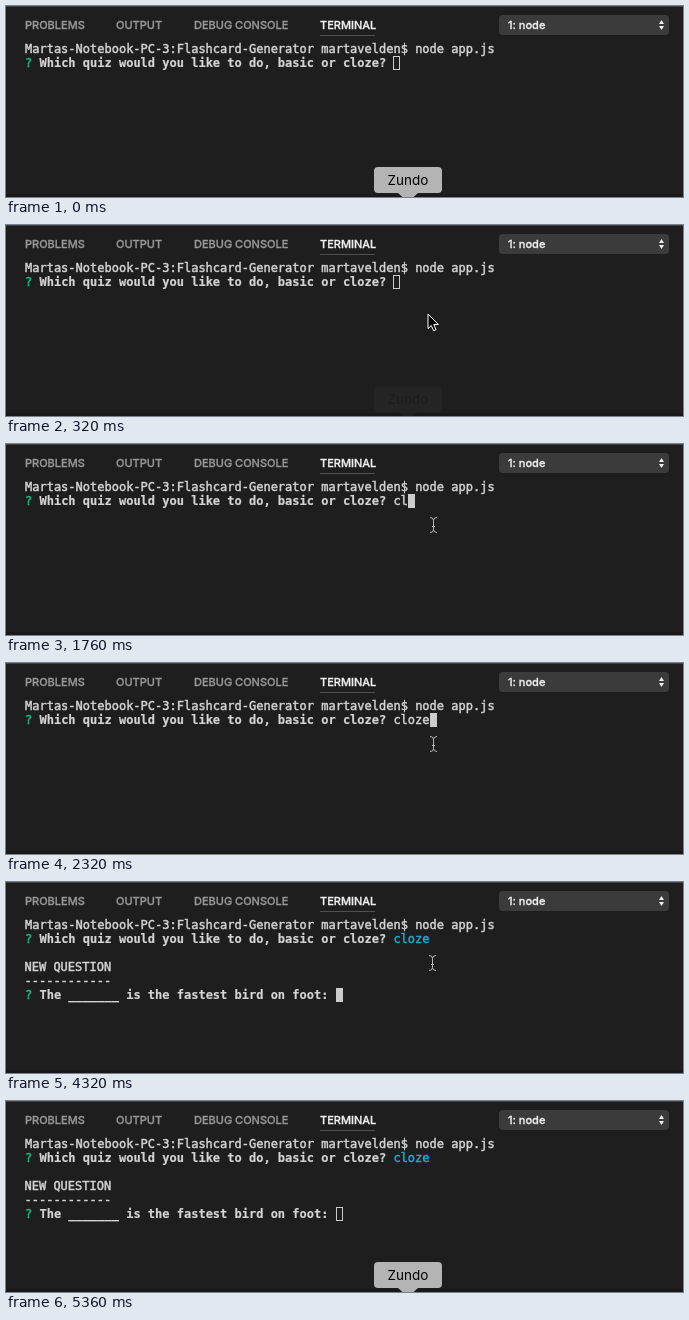
An HTML page that plays this animation: 677x191 px, repeating every 5.44 s.

```html
<!DOCTYPE html>
<html lang="en">
<head>
<meta charset="utf-8">
<title>Terminal quiz</title>
<style>
  html, body { margin: 0; width: 100%; height: 100%; overflow: hidden; background: #1e1e1e; }
  svg { display: block; }
  text { white-space: pre; }
  .ui { font: 500 11px Inter, sans-serif; }
  .ui text { fill: #979797; stroke: #979797; stroke-width: .3; }
  .ui .lit { fill: #f0f0f0; stroke: #f0f0f0; }
  .term { font: 12px "DejaVu Sans Mono", monospace; fill: #d4d4d4; stroke: #d4d4d4; stroke-width: .45; }
  .bold { font-weight: bold; stroke-width: .2; }
  .ok { font-weight: normal; fill: #15bf84; stroke: #15bf84; stroke-width: .4; }
  .done { fill: #14b0d8; stroke: #14b0d8; }
</style>
</head>
<body>
<svg width="677" height="191" viewBox="0 0 677 191">
  <rect width="677" height="191" fill="#1e1e1e"/>
  <rect width="677" height="1" fill="#414141"/>
  <rect y="188" width="677" height="3" fill="#19191a"/>

  <g class="ui">
    <text x="19" y="23">PROBLEMS</text>
    <text x="110" y="23">OUTPUT</text>
    <text x="188" y="23">DEBUG CONSOLE</text>
    <text x="314" y="23" class="lit">TERMINAL</text>
    <rect x="314" y="29" width="55" height="1" fill="#505050"/>
    <rect x="493" y="9" width="170" height="20" rx="4" fill="#3b3b3b"/>
    <text x="502" y="23" class="lit">1: node</text>
    <path d="M653 18l2.5-4 2.5 4zM653 20l2.5 4 2.5-4z" fill="#eee"/>
  </g>

  <g class="term">
    <text x="19" y="47">Martas-Notebook-PC-3:Flashcard-Generator martavelden$ node app.js</text>
    <text x="19" y="61" class="bold"><tspan class="ok">?</tspan> Which quiz would you like to do, basic or cloze?</text>
    <text id="answer" x="387.4" y="61"></text>
    <g id="question">
      <text x="18.5" y="89">NEW QUESTION</text>
      <text x="18.5" y="103">------------</text>
      <text x="19" y="117" class="bold"><tspan class="ok">?</tspan> The _______ is the fastest bird on foot:</text>
    </g>
  </g>
  <rect id="caret" width="6" height="13" stroke="#ccc"/>

  <g id="tip">
    <path d="M372 161h60q4 0 4 4v18q0 4-4 4h-20l-10 9-10-9h-20q-4 0-4-4v-18q0-4 4-4z" fill="#b4b4b4"/>
    <text x="402" y="179" text-anchor="middle" style="font:13.5px Inter,sans-serif">Zundo</text>
  </g>

  <path id="arrow" d="M0 0V14.6L3.3 11.5 5.6 16.7 8 15.7 5.8 10.5H10.4Z" stroke="#fff" stroke-linejoin="round"/>
  <path id="beam" d="M-3-7.5Q.5-7.5 .5-4.5Q.5-7.5 4-7.5M.5-4.5V4.5M-3 7.5Q.5 7.5 .5 4.5Q.5 7.5 4 7.5M-1 1.5H2" fill="none" stroke="#b8b8b8"/>
</svg>
<script>
  const LOOP = 5440, STEP = 80, CHAR = 7.224;
  const KEYS = [1600, 1760, 1920, 2080, 2320];
  const $ = id => document.getElementById(id);
  const clamp = v => Math.max(0, Math.min(1, v));
  const show = (id, on) => $(id).setAttribute("visibility", on ? "visible" : "hidden");

  function pointerAt(t) {
    if (t < 720) {
      const left = 1 - clamp(t / 560);
      return [427 - 25 * left ** 2, 80 + 115 * left ** 3];
    }
    if (t < 800) return [444, 86];
    const p = clamp((t - 4240) / 560);
    return [427 - 30.5 * p ** 2, 81 + 73.5 * p ** 2.6];
  }

  function caretAt(t, typed) {
    if (t >= 3040) return [43, 5];
    if (t >= 2960) return [0, 2];
    return [51 + typed, 1];
  }

  function draw(time) {
    const t = Math.floor(time % LOOP / STEP) * STEP;
    const typed = KEYS.filter(k => t >= k).length;
    $("answer").textContent = "cloze".slice(0, typed);
    $("answer").classList.toggle("done", t >= 2960);
    show("question", t >= 3040);

    const [col, row] = caretAt(t, typed);
    $("caret").setAttribute("x", Math.round(19 + col * CHAR) + .5);
    $("caret").setAttribute("y", 36.5 + row * 14);
    $("caret").setAttribute("fill", t >= 800 && t < 5360 ? "#ccc" : "none");

    const fade = t < 4800 ? clamp(1 - t / 400) ** 2 : clamp((t - 4800) / 240);
    $("tip").setAttribute("opacity", fade);

    const [x, y] = pointerAt(t);
    const place = `translate(${Math.floor(x)},${Math.round(y)})`;
    $("arrow").setAttribute("transform", place);
    $("beam").setAttribute("transform", place);
    show("arrow", t >= 80 && t < 720);
    show("beam", t >= 720 && t < 4880);
  }

  const start = performance.now();
  function tick() {
    draw(performance.now() - start);
    requestAnimationFrame(tick);
  }
  tick();
</script>
</body>
</html>
```
